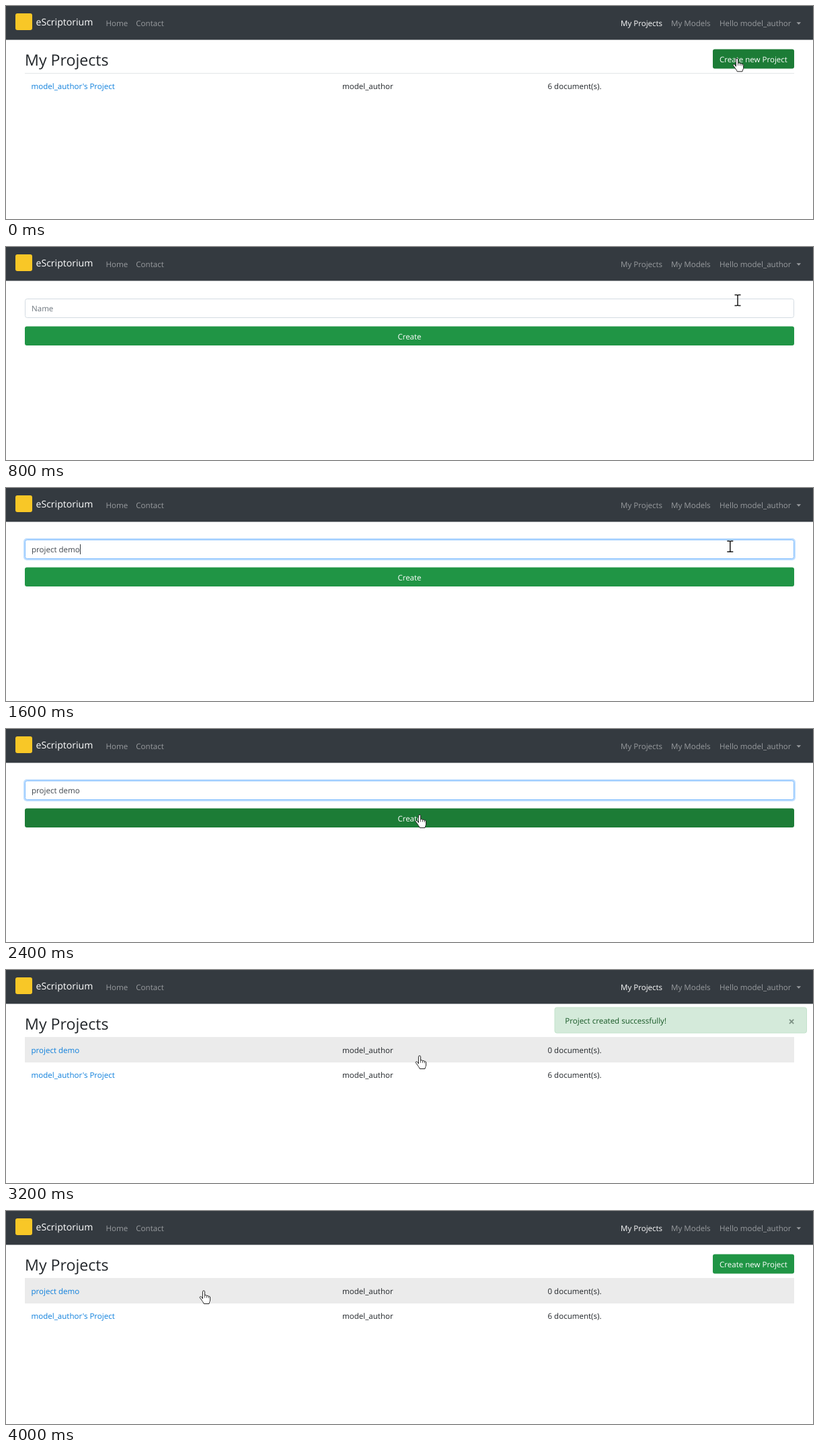
Write an HTML page that moves like this. It is 1200 by 318 pixels and loops after 4800 ms.

```html
<!DOCTYPE html>
<html lang="en">
<head>
<meta charset="utf-8">
<title>Creating a project</title>
<style>
  html, body { margin: 0; width: 100%; height: 100%; overflow: hidden; background: #fff; }
  svg { display: block; width: 1200px; height: 318px; }
  text {
    font: 11.55px "Open Sans", "Noto Sans", sans-serif;
    fill: #212529;
    text-rendering: geometricPrecision;
    white-space: pre;
  }
  .nav { fill: #999c9f; }
  .nav.active, .light { fill: #fff; }
  .brand { font-size: 14.1px; fill: #fff; }
  .title { font-size: 23.15px; }
  .link { fill: #0d7fdc; }
  .hint { fill: #6c757d; }
  .typed { fill: #40474e; }
  .note { fill: #155724; }
  .close { font-size: 17px; font-weight: 700; fill: #7d9184; }
  .green { fill: #209545; }
  .green.hover { fill: #1c7c36; }
  .field { fill: #fff; stroke: #d3dbe2; }
  .focus .field { stroke: #80bdff; }
  .halo { fill: #bfdeff; display: none; }
  .focus .halo { display: inline; }
</style>
</head>
<body>
<svg viewBox="0 0 1200 318">
  <rect width="1200" height="50.5" fill="#343a40"/>
  <rect x="14" y="11" width="25" height="25" rx="3" fill="#f8c727"/>
  <text class="brand" x="44.5" y="28.7">eScriptorium</text>
  <text class="nav" x="148.5" y="30">Home</text>
  <text class="nav" x="193.3" y="30">Contact</text>
  <text class="nav" id="projects" x="914" y="30">My Projects</text>
  <text class="nav" x="989" y="30">My Models</text>
  <text class="nav" x="1061" y="30">Hello model_author</text>
  <path d="M1175.5 24.3h6.6l-3.3 3.4z" fill="#999c9f"/>

  <g id="list">
    <text class="title" x="28" y="89">My Projects</text>
    <rect x="28" y="100" width="1144" height="1" fill="#e3e5e7"/>
    <rect id="rowHover" x="28" y="100" width="1144" height="38" fill="#ebebeb"/>
    <g id="rows"></g>
    <rect class="green" id="newButton" x="1051" y="64.5" width="121" height="29" rx="3"/>
    <text class="light" x="1061" y="83.8">Create new Project</text>
  </g>

  <g id="form">
    <rect class="halo" x="26" y="75" width="1148" height="33" rx="5"/>
    <rect class="field" x="28.5" y="77.5" width="1143" height="28" rx="3"/>
    <text id="value" x="38" y="96"></text>
    <rect id="caret" x="110" y="84" width="1" height="15" fill="#343a40"/>
    <rect class="green" id="createButton" x="28" y="118.5" width="1144" height="28.5" rx="3"/>
    <text class="light" x="600" y="137.8" text-anchor="middle">Create</text>
  </g>

  <g id="toast">
    <rect x="816" y="56" width="374.5" height="38" rx="3" fill="#d4eada" stroke="#c3e2cb"/>
    <text class="note" x="831.3" y="79.7">Project created successfully!</text>
    <text class="close" x="1168" y="83.2" text-anchor="middle">×</text>
  </g>

  <g id="hand" stroke="#222" stroke-linejoin="round" stroke-linecap="round">
    <path fill="#fff" d="M-1.6 11.5V1.6a1.6 1.6 0 0 1 3.2 0V7.2c.5-1 2.8-.8 3 .6c.6-.8 2.6-.5 2.8.8c.7-.6 2.2-.2 2.2 1.4V14c0 2-1.4 3-1.6 5.5H.2c-.6-2.4-2.2-3.2-3-5.2L-5.6 10.6c-.8-1.3.8-2.6 2-1.6z"/>
    <path fill="none" stroke-width=".8" d="M1.6 7v3.2M4.6 7.8v2.6M7.4 8.6v2.2"/>
  </g>
  <path id="beam" fill="none" stroke="#1b1b1b" stroke-width="1.5"
    d="M-4.5 -8h3.2q1.3 0 1.3 1.2q0 -1.2 1.3 -1.2h3.2M0 -7V7M-4.5 8h3.2q1.3 0 1.3 -1.2q0 1.2 1.3 1.2h3.2"/>
</svg>
<script>
const HOLD = 800;
const OWNER = "model_author";
const NEW_NAME = "project demo";
const oldRow = [OWNER + "'s Project", 6];
const newRow = [NEW_NAME, 0];

const steps = [
  { rows: [oldRow], hover: "new", hand: [1087, 78.3] },
  { beam: [1088, 79.5] },
  { value: NEW_NAME, caret: true, beam: [1076.8, 87.3] },
  { value: NEW_NAME, hover: "create", hand: [615, 128] },
  { rows: [newRow, oldRow], hover: "row", toast: true, hand: [615, 128] },
  { rows: [newRow, oldRow], hover: "row", hand: [294, 119] }
];

const $ = id => document.getElementById(id);
const show = (id, on) => { $(id).style.display = on ? "inline" : "none"; };

function place(id, at) {
  show(id, at);
  if (at) $(id).setAttribute("transform", `translate(${at})`);
}

function rowMarkup([name, count], i) {
  const y = 124 + i * 37;
  return `<text class="link" x="37.5" y="${y}">${name}</text>
    <text x="500" y="${y}">${OWNER}</text>
    <text x="805.5" y="${y}">${count} document(s).</text>`;
}

function render(step) {
  const { rows, value, hover } = step;
  show("list", rows);
  show("form", !rows);
  show("toast", step.toast);
  show("caret", step.caret);
  show("rowHover", hover === "row");
  place("hand", step.hand);
  place("beam", step.beam);
  $("projects").classList.toggle("active", !!rows);
  $("newButton").classList.toggle("hover", hover === "new");
  $("createButton").classList.toggle("hover", hover === "create");
  $("form").classList.toggle("focus", !!value);
  $("value").textContent = value || "Name";
  $("value").setAttribute("class", value ? "typed" : "hint");
  $("rows").innerHTML = (rows || []).map(rowMarkup).join("");
}

const start = performance.now();
let current = -1;

function tick() {
  const index = Math.floor((performance.now() - start) / HOLD) % steps.length;
  if (index !== current) render(steps[current = index]);
  requestAnimationFrame(tick);
}
tick();
</script>
</body>
</html>
```
